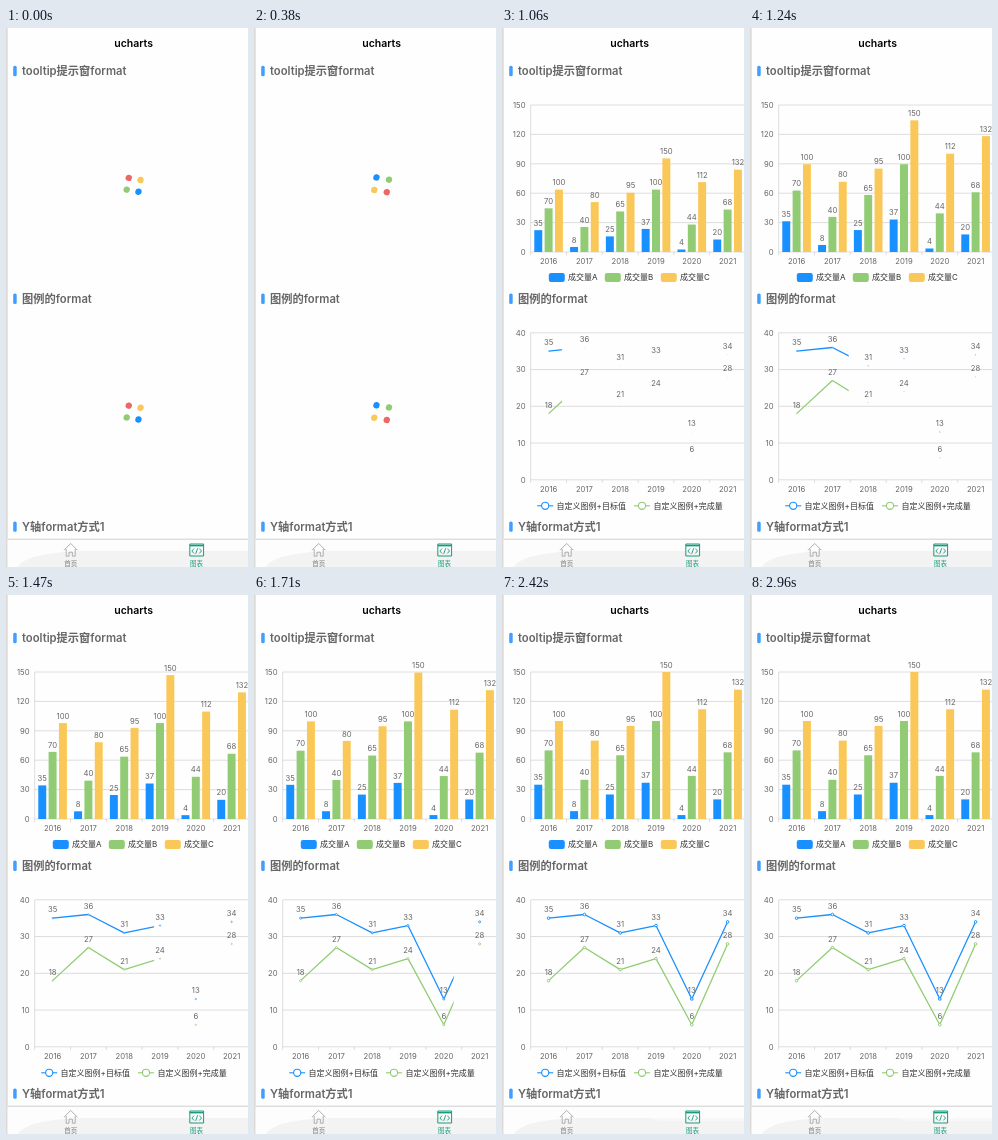
An HTML page that plays this animation: 242x539 px, repeating every 3.85 s.

```html
<!DOCTYPE html>
<html lang="zh">
<head>
<meta charset="utf-8">
<style>
html, body { margin: 0; width: 100%; height: 100%; overflow: hidden; background: #fefefe; }
svg { display: block; width: 242px; height: 539px; font-family: Inter, "Noto Sans CJK SC", "Noto Sans CJK", sans-serif; }
</style>
</head>
<body>
<svg id="stage" viewBox="0 0 242 539" xmlns="http://www.w3.org/2000/svg"></svg>
<script>
const BLUE = '#1890ff', GREEN = '#91cb74', YELLOW = '#fac858', RED = '#ee6666';
const COLORS = [BLUE, GREEN, YELLOW];
const LOOP = 3850, SHOW = 940, START = 915, DURATION = 1000;
const LEFT = 28.7, STEP = 35.8, WIDTH = STEP * 6, BASE = 224, HEIGHT = 147, OFFSET = 227.8;
const stage = document.getElementById('stage');

function add(parent, tag, attrs = {}) {
  const node = document.createElementNS(stage.namespaceURI, tag);
  for (const key in attrs) node.setAttribute(key, attrs[key]);
  return parent.appendChild(node);
}
// y is the vertical middle of the text
function text(parent, x, y, value, size = 7.7, fill = '#666', attrs = {}) {
  const node = add(parent, 'text', { x, y: y + size * 0.36, 'font-size': size, fill, 'text-anchor': 'middle', ...attrs });
  node.textContent = value;
  return node;
}
const left = { 'text-anchor': 'start' };
const stroke = (d, color, width, parent = stage) =>
  add(parent, 'path', { d, fill: 'none', stroke: color, 'stroke-width': width });
const center = i => LEFT + STEP * (i + 0.5);

// Page
add(stage, 'rect', { width: 1.7, height: 539, fill: '#dcdad5' });
text(stage, 127.6, 15, 'ucharts', 10.5, '#000', { 'font-weight': 600 });
['tooltip提示窗format', '图例的format', 'Y轴format方式1'].forEach((title, i) => {
  const y = 43 + 227.8 * i;
  add(stage, 'rect', { x: 7.2, y: y - 5.2, width: 3.5, height: 10.4, rx: 1.5, fill: '#409eff' });
  text(stage, 16, y, title, 11.25, '#666', { ...left, 'font-weight': 600 });
});

// Loaders: four dots that swap places across the centre
const loaders = add(stage, 'g');
const dots = [];
for (const y of [156.8, 384.6]) {
  const g = add(loaders, 'g', { transform: `translate(127.6 ${y}) rotate(10)` });
  [[-1, -1, BLUE], [1, -1, GREEN], [-1, 1, YELLOW], [1, 1, RED]].forEach(([dx, dy, fill]) =>
    dots.push({ dx, dy, node: add(g, 'circle', { r: 3.2, fill }) }));
}

// Charts
const charts = add(stage, 'g');
function axes(g, max, interval) {
  for (let v = 0; v <= max; v += interval) {
    const y = BASE - v / max * HEIGHT;
    stroke(`M${LEFT} ${y}H242`, '#ccc', 0.65, g);
    text(g, 23.5, y, v, 7.7, '#666', { 'text-anchor': 'end' });
  }
  stroke(`M${LEFT} ${BASE - HEIGHT}V${BASE}`, '#ccc', 0.65, g);
  for (let i = 0; i < 6; i++) {
    stroke(`M${LEFT + STEP * i} ${BASE}v3.2`, '#ccc', 0.65, g);
    text(g, center(i), 233.5, 2016 + i);
  }
}

const barChart = add(charts, 'g');
axes(barChart, 150, 30);
const barWidth = STEP * 0.8 / 3.6;
const bars = [];
[[35, 8, 25, 37, 4, 20], [70, 40, 65, 100, 44, 68], [100, 80, 95, 150, 112, 132]].forEach((row, s) => {
  row.forEach((value, i) => {
    const x = LEFT + STEP * (i + 0.1) + barWidth * 1.3 * s;
    bars.push({
      full: value / 150 * HEIGHT,
      rect: add(barChart, 'rect', { x, width: barWidth, fill: COLORS[s] }),
      label: text(barChart, x + barWidth / 2, 0, value)
    });
  });
  const x = 46.8 + 56 * s;
  add(barChart, 'rect', { x, y: 245, width: 16, height: 9, rx: 2.2, fill: COLORS[s] });
  text(barChart, x + 19.2, 249.5, '成交量' + 'ABC'[s], 8, '#333', left);
});
bars.forEach(b => barChart.append(b.label));

const lineChart = add(charts, 'g', { transform: `translate(0 ${OFFSET})` });
axes(lineChart, 40, 10);
const clip = add(add(lineChart, 'clipPath', { id: 'reveal' }), 'rect', { x: LEFT, y: 70, height: 160 });
const markers = [];
[[35, 36, 31, 33, 13, 34], [18, 27, 21, 24, 6, 28]].forEach((row, s) => {
  const points = row.map((v, i) => [center(i), BASE - v / 40 * HEIGHT]);
  add(lineChart, 'polyline', {
    points: points.join(' '), fill: 'none', stroke: COLORS[s], 'stroke-width': 1.28,
    'stroke-linejoin': 'bevel', 'clip-path': 'url(#reveal)'
  });
  points.forEach(([x, y], i) => {
    markers.push({ x, y, node: add(lineChart, 'circle', { r: 1.3, fill: '#fff', stroke: COLORS[s], 'stroke-width': 1 }) });
    text(lineChart, x, y - 8.5, row[i]);
  });
  const x = 35.2 + 96.8 * s;
  stroke(`M${x} 250h16`, COLORS[s], 1.1, lineChart);
  add(lineChart, 'circle', { cx: x + 8, cy: 250, r: 3.6, fill: '#fff', stroke: COLORS[s], 'stroke-width': 1.1 });
  text(lineChart, x + 19.4, 250, '自定义图例+' + ['目标值', '完成量'][s], 8, '#333', left);
});

// Tab bar
const GRAY = '#a8a8a8', TEAL = '#1a9c7c';
add(stage, 'rect', { x: 1.7, y: 511, width: 241, height: 28, fill: '#fdfdfd' });
add(stage, 'path', { d: 'M12 539C16 531 32 525 75 523H242V539Z', fill: '#f3f3f3' });
const sheen = add(stage, 'path', { d: 'M146 523H242V526H160Z', fill: '#f8f8f8' });
stroke('M1.7 511.2H242', '#cfcfcf', 1);
stroke('M58 522.2L64.7 515.4L71.4 522.2M60.2 521V528.2H63V524.2H66.4V528.2H69.2V521', GRAY, 0.9);
stroke('M183.8 516H197.6V528H183.8Z', TEAL, 1);
stroke('M183.8 517.6H197.6', TEAL, 1.6);
stroke('M188 520.6L185.9 523L188 525.4M193.4 520.6L195.5 523L193.4 525.4M191.7 520.2L189.7 525.8', TEAL, 0.9);
text(stage, 64.7, 536, '首页', 6.5, '#777');
text(stage, 190.6, 536, '图表', 6.5, TEAL);

// CSS "ease": cubic-bezier(.25, .1, .25, 1)
function ease(x) {
  const bezier = (a, b, u) => 3 * a * u * (1 - u) ** 2 + 3 * b * u * u * (1 - u) + u ** 3;
  let lo = 0, hi = 1;
  for (let i = 0; i < 20; i++) {
    const mid = (lo + hi) / 2;
    if (bezier(0.25, 0.25, mid) < x) lo = mid; else hi = mid;
  }
  return bezier(0.1, 1, lo);
}

function draw(t) {
  const loading = t < SHOW;
  loaders.setAttribute('display', loading ? 'inline' : 'none');
  charts.setAttribute('display', loading ? 'none' : 'inline');
  sheen.setAttribute('opacity', Math.min(1, Math.max(0, (t - 2240) / 180)));
  if (loading) {
    const phase = ((t < 90 ? 0 : t) + 615) % 1000 / 500;
    const reach = 6.4 * (1 - 2 * ease(phase > 1 ? 2 - phase : phase));
    for (const { dx, dy, node } of dots) {
      node.setAttribute('cx', dx * reach);
      node.setAttribute('cy', dy * reach);
    }
    return;
  }
  const p = Math.min(1, (t - START) / DURATION);
  const grow = p === 1 ? 1 : 1 - 2 ** (-10 * p);
  for (const { full, rect, label } of bars) {
    const h = full * grow;
    rect.setAttribute('y', BASE - h);
    rect.setAttribute('height', h);
    label.setAttribute('y', BASE - h - 7.1 + 7.7 * 0.36);
  }
  clip.setAttribute('width', WIDTH * p);
  for (const { x, y, node } of markers) node.setAttribute('transform', `translate(${x} ${y}) scale(${p})`);
}

const begin = performance.now();
function tick() {
  draw((performance.now() - begin) % LOOP);
  requestAnimationFrame(tick);
}
tick();
</script>
</body>
</html>
```
